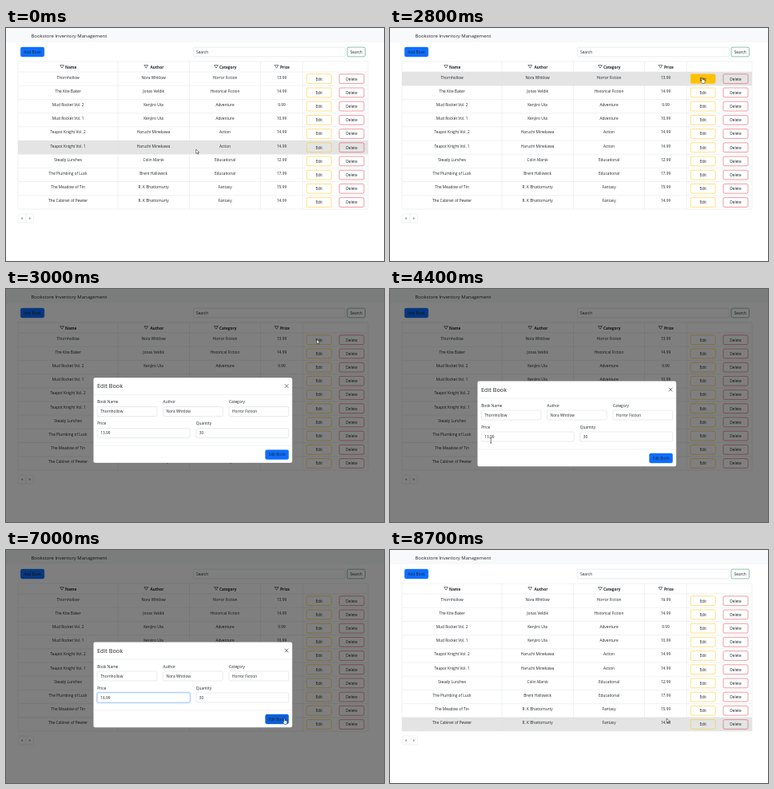
An HTML page that plays this animation: 473 px wide and 292 px high, repeating every 9100 ms.

```html
<!DOCTYPE html>
<html lang="en">
<head>
<meta charset="utf-8">
<title>Bookstore Inventory Management</title>
<style>
  html, body { margin: 0; width: 100%; height: 100%; overflow: hidden; background: #fff; }
  svg { display: block; width: 100vw; height: 100vh; }
  text { font-family: "Open Sans", "Noto Sans", sans-serif; font-size: 4.8px; fill: #212529; white-space: pre; }
</style>
</head>
<body>
<svg id="stage" viewBox="0 0 473 292"></svg>
<script>
const LOOP = 9100, STEP = 100;
const ROW_TOP = 55, ROW_H = 17.2, LEFT = 15, RIGHT = 453;
const BLUE = '#0d6efd', YELLOW = '#ffc107', RED = '#dc3545', GREEN = '#198754';
const LINE = '#dee2e6', INK = '#212529';

const volumes = (name, author, kind, prices) =>
  prices.map((price, i) => [`${name} Vol. ${2 - i}`, author, kind, price]);

const books = [
  ['Thornhollow', 'Nora Whitlow', 'Horror Fiction', '13.99'],
  ['The Kite Baker', 'Jonas Veldik', 'Historical Fiction', '14.99'],
  ...volumes('Mud Rocket', 'Kenjiro Uta', 'Adventure', ['9.99', '10.99']),
  ...volumes('Teapot Knight', 'Haruchi Minekawa', 'Action', ['14.99', '14.99']),
  ['Steady Lunches', 'Colin Marsk', 'Educational', '12.99'],
  ['The Plumbing of Luck', 'Brent Hallowick', 'Educational', '17.99'],
  ['The Meadow of Tin', 'R. K Bhattomurty', 'Fantasy', '15.99'],
  ['The Cabinet of Pewter', 'R. K Bhattomurty', 'Fantasy', '14.99'],
];

const tag = (name, attrs, body = '') =>
  `<${name} ${Object.entries(attrs).map(([k, v]) => `${k}="${v}"`).join(' ')}>${body}</${name}>`;
const rect = (x, y, width, height, attrs) => tag('rect', { x, y, width, height, ...attrs });
const text = (x, y, body, attrs = {}) => tag('text', { x, y, ...attrs }, body);
const centered = (x, y, body, attrs = {}) => text(x, y, body, { 'text-anchor': 'middle', ...attrs });
const path = (d, attrs) => tag('path', { d, ...attrs });
const rules = d => path(d, { stroke: LINE, 'stroke-width': 0.5, fill: 'none' });

function button(x, y, w, label, color, { solid = false, id = '' } = {}) {
  const box = { rx: 1.8, fill: solid ? color : 'none', stroke: color, 'stroke-width': 0.5 };
  const ink = { fill: solid ? '#fff' : color };
  if (id) { box.id = id; ink.id = id + 'Label'; }
  return rect(x, y, w, 11.8, box) + centered(x + w / 2, y + 7.7, label, ink);
}

function field(x, y, w, label, value, id) {
  return text(x, y - 4.3, label) +
    rect(x, y, w, 12, { rx: 1.8, fill: '#fff', stroke: '#ced4da', 'stroke-width': 0.5, id: id + 'Box' }) +
    text(x + 4, y + 7.8, value, { id });
}

function navbar() {
  return rect(0, 0, 473, 18, { fill: '#f8f9fa' }) +
    text(31.5, 11.7, 'Bookstore Inventory Management', { style: 'font-size:5.96px' }) +
    button(18.3, 24.1, 29.5, 'Add Book', BLUE, { solid: true }) +
    rect(234.3, 24.1, 190, 11.8, { rx: 1.8, fill: '#fff', stroke: '#ced4da', 'stroke-width': 0.5 }) +
    text(238, 31.8, 'Search', { fill: '#6c757d' }) +
    button(427, 24.1, 22.4, 'Search', GREEN);
}

function table() {
  const bottom = ROW_TOP + ROW_H * books.length;
  const heads = [['Name', 70, 74], ['Author', 175.3, 180.5], ['Category', 263, 267], ['Price', 338.5, 343]];
  const centers = [77.6, 184.6, 274, 345];
  let out = rect(LEFT, ROW_TOP, RIGHT - LEFT, ROW_H, { id: 'hover', fill: '#e4e4e4' });
  let grid = `M${LEFT} 42H${RIGHT}`;
  for (const x of [LEFT, 140, 229.5, 318.5, 371.3, RIGHT]) grid += `M${x} 42V${bottom}`;
  for (let i = 0; i <= books.length; i++) grid += `M${LEFT} ${ROW_TOP + i * ROW_H}H${RIGHT}`;
  out += rules(grid);
  for (const [label, icon, x] of heads) {
    out += path(`M${icon - 2.4} 46.6h4.8l-2.4 3.6z`, { fill: 'none', stroke: INK, 'stroke-width': 0.6, 'stroke-linejoin': 'round' });
    out += text(x, 50.6, label, { 'font-weight': 700 });
  }
  books.forEach((book, i) => {
    const y = ROW_TOP + i * ROW_H;
    book.forEach((cell, c) => {
      out += centered(centers[c], y + 8.6, cell, i === 0 && c === 3 ? { id: 'rowPrice' } : {});
    });
    out += button(376.2, y + 2.8, 31, 'Edit', YELLOW, { id: i ? '' : 'edit' });
    out += button(417, y + 2.8, 31, 'Delete', RED);
  });
  return out;
}

function pager() {
  return rect(15.2, 233, 19.4, 11, { rx: 1.8, fill: '#fff', stroke: LINE, 'stroke-width': 0.5 }) +
    rules('M25 233V244') +
    centered(20.1, 240.2, '«', { fill: '#6c757d' }) + centered(29.8, 240.2, '»', { fill: '#6c757d' });
}

function modal() {
  return rect(109.3, 115.3, 249, 107.2, { rx: 2.5, fill: '#fff', stroke: '#666', 'stroke-width': 0.3 }) +
    text(114, 128.8, 'Edit Book', { style: 'font-size:7.25px' }) +
    path('M348.8 123.7l4.6 4.6m0-4.6l-4.6 4.6', { stroke: '#555', 'stroke-width': 0.8 }) +
    rules('M109.5 137H358M109.5 200.8H358') +
    field(114.2, 152, 74.8, 'Book Name', books[0][0], 'name') +
    field(196.6, 152, 74.8, 'Author', books[0][1], 'author') +
    field(279, 152, 74.8, 'Category', books[0][2], 'kind') +
    rect(113.6, 178.4, 117.2, 13.2, { id: 'ring', rx: 2.4, fill: 'none', stroke: BLUE, 'stroke-opacity': 0.25, 'stroke-width': 1.2 }) +
    field(114.2, 179, 116, 'Price', '13.99', 'price') +
    field(237.8, 179, 116, 'Quantity', '30', 'count') +
    rect(123.6, 182, 0.4, 6, { id: 'caret', fill: '#000' }) +
    button(324.6, 206.1, 29, 'Edit Book', BLUE, { solid: true, id: 'save' });
}

function cursors() {
  const skin = { fill: '#fff', stroke: '#000', 'stroke-width': 0.45, 'stroke-linejoin': 'round' };
  return path('M0 0V5.4L1.3 4.3L2.2 6.2L3 5.8L2.2 4H3.9Z', { id: 'arrow', ...skin }) +
    path('M-.6 .5Q0-.4.6.5V2.7Q1.2 2.2 1.6 2.9Q2.2 2.5 2.6 3.2Q3.4 2.9 3.5 3.8V5.4L2.8 7.4H-.1L-2 4.6Q-2 3.7-1.2 4.1L-.6 4.7Z', { id: 'hand', ...skin }) +
    path('M-1.2-3.2Q0-3.2 0-2.6Q0-3.2 1.2-3.2M0-2.6V2.6M-1.2 3.2Q0 3.2 0 2.6Q0 3.2 1.2 3.2', { id: 'beam', fill: 'none', stroke: '#000', 'stroke-width': 0.5 });
}

const stage = document.getElementById('stage');
stage.innerHTML = rect(0, 0, 473, 292, { fill: '#fff' }) + navbar() + table() + pager() +
  rect(0, 0, 473, 292, { id: 'backdrop', fill: '#000' }) +
  tag('g', { id: 'modal' }, modal()) + tag('g', { id: 'pointer' }, cursors());

const el = {};
stage.querySelectorAll('[id]').forEach(node => { el[node.id] = node; });
const set = (id, name, value) => el[id].setAttribute(name, value);
const show = (id, on) => set(id, 'visibility', on ? 'visible' : 'hidden');
const clamp = v => Math.min(1, Math.max(0, v));
const ramp = (t, from, to) => clamp((t - from) / (to - from));
const smooth = u => u * u * (3 - 2 * u);

// Each move: start time, end time, destination.
const moves = [
  [1100, 2100, 390.6, 62],
  [2800, 2900, 388.8, 63.3],
  [3700, 4400, 126.3, 190],
  [4500, 4800, 125, 184.8],
  [6100, 6800, 348.3, 211],
  [7100, 7200, 346.2, 211],
];

function pointerAt(t) {
  let x = 237.8, y = 152;
  for (const [from, to, tx, ty] of moves) {
    const u = smooth(ramp(t, from, to));
    x += (tx - x) * u;
    y += (ty - y) * u;
  }
  return [x, y];
}

function draw(t) {
  const [x, y] = pointerAt(t);
  const open = t > 2800 && t < 7200;
  const closing = 1 - ramp(t, 7000, 7200);
  const slide = ramp(t, 2860, 3160);

  const onEdit = !open && x > 376 && x < 407 && y < 70;
  const onSave = open && x > 324.6 && y > 206;
  const onPrice = open && x < 230 && y > 178 && y < 191;
  const kind = onEdit || onSave ? 'hand' : onPrice ? 'beam' : 'arrow';
  for (const id of ['arrow', 'hand', 'beam']) show(id, id === kind);
  set('pointer', 'transform', `translate(${x} ${y})`);

  show('hover', !open && t !== 7200);
  set('hover', 'y', ROW_TOP + ROW_H * Math.floor((y - ROW_TOP) / ROW_H));
  set('edit', 'fill', onEdit ? YELLOW : 'none');
  set('editLabel', 'fill', onEdit ? '#000' : YELLOW);
  el.rowPrice.textContent = t >= 7200 ? '16.99' : '13.99';

  set('backdrop', 'opacity', 0.5 * ramp(t, 2810, 2960) * closing);
  set('modal', 'opacity', ramp(t, 2860, 3000) * closing);
  set('modal', 'transform', `translate(0 ${-15.5 * ((1 - slide) ** 2 + (1 - closing) ** 2)})`);
  set('save', 'fill', onSave ? '#0b5ed7' : BLUE);

  const focused = open && t >= 4700;
  set('ring', 'stroke-opacity', focused ? 0.25 : 0);
  set('priceBox', 'stroke', focused ? '#86b7fe' : '#ced4da');
  el.price.textContent = t < 5600 ? '13.99' : t < 5800 ? '1.99' : '16.99';
  const caretOn = (t >= 4700 && t < 5200) || (t >= 5600 && t < 6300);
  set('caret', 'opacity', caretOn ? 1 : 0);
  set('caret', 'x', t >= 5600 && t < 5800 ? 120.9 : 123.6);
}

const begin = performance.now();
function tick() {
  const t = (performance.now() - begin) % LOOP;
  draw(Math.floor(t / STEP) * STEP);
  requestAnimationFrame(tick);
}
tick();
</script>
</body>
</html>
```
